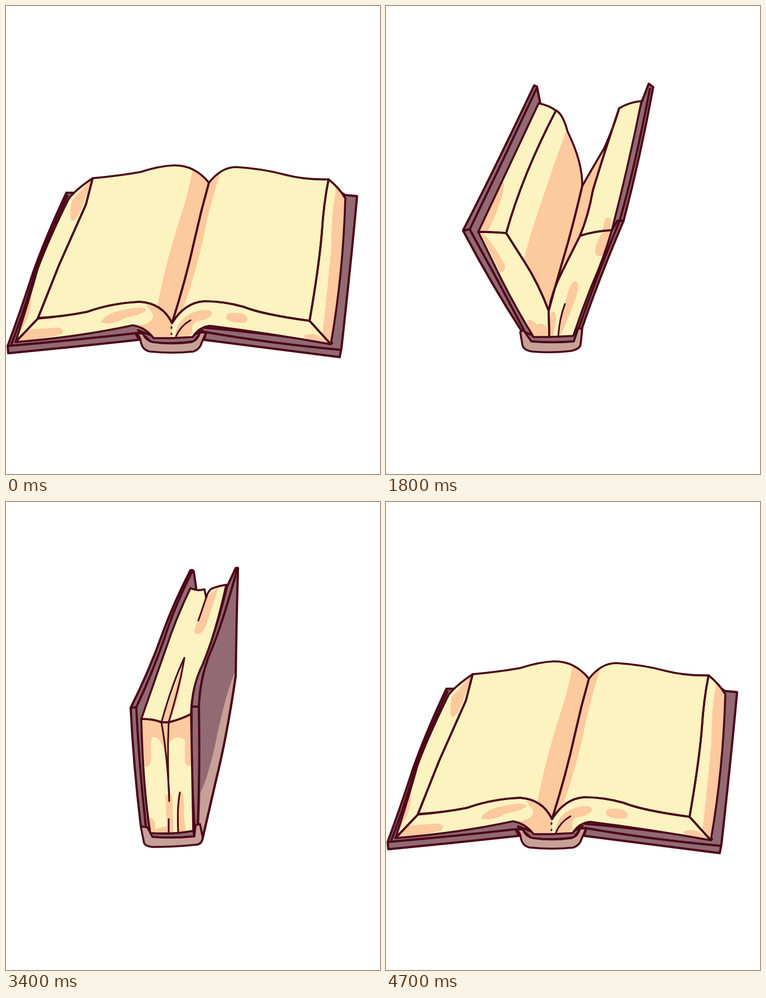
An HTML page with a canvas that plays this animation: 669x837 px, repeating every 5210 ms.

```html
<!DOCTYPE html>
<html lang="en">
<head>
<meta charset="utf-8">
<title>Book</title>
<style>
html, body { margin: 0; width: 100%; height: 100%; overflow: hidden; background: #fff; }
canvas { display: block; }
</style>
</head>
<body>
<canvas id="stage" width="669" height="837"></canvas>
<script>
const ctx = document.getElementById('stage').getContext('2d');
const INK = '#4b0718', COVER = '#926a74', SPINE = '#c7a198', PAGE = '#fcf3c1', TINT = '#fdc99f';

// Every path uses absolute "x y" pairs, so matching poses can be blended.
const open = {
  board: [
    'M108 334 L124 334 L150 320 L363 330 L580 320 L606 338 L628 340 Q617 460 600 612 L597 628 Q470 612 354 597 L358 584 L232 586 L238 597 Q120 610 4 621 L3 608 Q28 540 48 478 Q70 415 108 334 Z',
    'M236 580 L262 590 L333 590 L352 580 L336 600 Q297 606 260 601 Z'
  ],
  edge: [
    'M3 608 Q120 598 234 585',
    'M356 583 Q470 603 599 615',
    'M110 339 Q75 415 53 472 Q38 530 10 604',
    'M340 574 Q450 583 583 603'
  ],
  spine: ['M232 585 Q240 590 241 600 Q244 616 258 618 Q297 622 335 618 Q347 614 350 602 L358 584 L347 584 Q343 598 332 601 Q297 606 262 601 Q250 598 245 586 Z'],
  left: [
    'M155 308 Q200 304 240 297 Q274 286 300 285 Q337 284 363 316 Q349 365 338 415 Q322 488 297 567 Q280 532 240 529 Q190 531 145 547 Q105 555 57 558 L95 463 Q122 402 143 355 L155 308 Z',
    'M155 308 Q125 328 112 345 Q75 420 56 472 Q40 530 17 601 L57 559 L95 463 Q122 402 143 355 L155 308 Z',
    'M297 594 L264 594 Q250 575 227 571 Q130 592 17 601 L57 559 Q105 555 145 547 Q190 531 240 529 Q280 532 297 567'
  ],
  right: [
    'M363 316 Q385 288 412 288 Q460 291 500 302 Q535 311 577 310 Q568 355 565 405 Q560 465 543 563 Q460 552 425 538 Q390 528 355 528 Q320 530 297 567 Q322 488 338 415 Q349 365 363 316 Z',
    'M577 310 Q596 325 607 344 Q603 480 581 605 L543 563 Q560 465 565 405 Q568 355 577 310 Z',
    'M297 567 Q320 530 355 528 Q390 528 425 538 Q460 552 543 563 L581 605 Q470 585 365 572 Q345 574 334 592 L297 594'
  ],
  tintL: [
    'M334 290 Q355 300 363 316 Q349 365 338 415 Q322 488 297 567 Q290 545 270 540 Q283 470 308 390 Q328 330 334 290 Z',
    'M155 308 L118 348 Q112 380 118 384 Q128 385 140 348 Z',
    'M42 512 Q50 525 38 560 L16 602 Q80 593 100 587 Q107 577 92 575 L35 579 L22 592 Z',
    'M170 566 Q175 547 230 540 Q245 538 252 543 Q245 552 215 557 Q190 572 170 566 Z',
    'M250 534 Q285 540 297 567 L297 596 L262 594 Q250 576 235 572 Q266 567 263 551 Z'
  ],
  tintR: [
    'M363 316 Q372 302 383 299 Q362 365 351 425 Q335 490 318 538 L297 567 Q322 488 338 415 Q349 365 363 316 Z',
    'M588 318 L609 344 Q603 480 581 605 L566 588 Q576 500 582 430 Q582 370 590 330 Z',
    'M394 552 Q400 546 423 550 Q438 558 428 566 Q405 568 394 560 Z',
    'M532 590 Q545 583 560 590 L581 605 L540 598 Z',
    'M302 592 Q305 560 335 548 Q365 538 369 550 Q365 560 342 564 Q330 568 334 586 L320 592 Z'
  ],
  ink: ['M304 591 Q312 572 330 562', 'M296 574 L296 576', 'M296 586 L296 587']
};

const wide = {
  board: [
    'M150 249 L168 256 L225 400 L300 590 L250 592 L235 588 Q130 562 26 537 L28 523 Q75 390 150 249 Z',
    'M574 264 L597 258 L600 266 Q578 420 566 527 Q470 555 356 590 L345 590 L320 590 L480 400 Z',
    'M245 582 L262 592 L333 592 L348 582 L336 600 Q297 605 258 600 Z'
  ],
  edge: [
    'M29 522 Q130 551 240 582',
    'M158 258 Q85 390 36 519 L28 523',
    'M594 264 Q572 410 566 516 Q470 540 352 583',
    'M544 505 L550 516 L566 516'
  ],
  spine: ['M236 584 L248 610 Q252 617 262 618 Q297 622 325 618 Q343 615 350 600 L358 584 L350 580 L336 600 Q297 605 258 600 L242 580 Z'],
  left: [
    'M203 242 Q255 268 290 272 Q335 280 363 316 Q358 355 346 395 Q310 490 297 575 Q285 520 205 517 Q140 506 102 490 Q150 370 203 242 Z',
    'M203 242 Q185 245 160 261 Q100 385 54 517 Q70 498 102 490 Q150 370 203 242 Z',
    'M54 517 Q70 498 102 490 Q140 506 205 517 Q285 520 297 575 L297 594 L260 594 Q240 572 205 565 Q130 545 54 517 Z'
  ],
  right: [
    'M363 316 Q380 284 430 274 Q500 270 537 251 Q520 330 513 390 Q508 430 503 480 Q425 492 380 498 Q312 515 297 575 Q310 490 346 395 Q358 355 363 316 Z',
    'M537 251 Q555 252 575 263 Q562 390 544 505 Q525 490 503 480 Q508 430 513 390 Q520 330 537 251 Z',
    'M297 575 Q312 515 380 498 Q425 492 503 480 Q525 490 544 505 Q450 535 380 560 Q345 570 335 592 L297 594 Z'
  ],
  tintL: [
    'M330 285 Q355 298 363 316 Q358 355 346 395 Q310 490 297 575 Q290 540 260 525 Q275 450 297 375 Q318 320 330 285 Z',
    'M104 375 Q115 385 104 420 Q90 470 72 500 L52 517 Z',
    'M152 265 L174 258 Q168 288 150 312 L130 312 Z',
    'M62 512 Q100 508 102 520 Q103 530 90 530 L54 517 Z',
    'M164 534 Q180 528 235 538 Q280 545 295 594 L260 594 Q250 565 235 552 Q190 548 168 543 Z'
  ],
  tintR: [
    'M363 316 Q372 302 385 297 Q365 370 355 420 Q340 480 325 520 Q305 540 297 575 Q310 490 346 395 Q358 355 363 316 Z',
    'M363 536 Q365 524 385 523 Q402 524 395 535 Q375 545 363 536 Z',
    'M303 590 Q312 550 345 545 Q355 552 335 562 Q312 575 310 592 Z',
    'M490 520 Q492 508 525 500 L546 506 L515 520 Z',
    'M548 360 Q560 355 561 362 Q555 440 546 506 L536 498 Q545 420 548 360 Z'
  ],
  ink: ['M306 592 Q310 572 327 561']
};

const narrow = {
  board: [
    'M265 142 L270 144 L276 174 L290 400 L300 590 L262 597 L243 582 Q190 500 139 404 L138 401 Q190 300 265 142 Z',
    'M458 170 L470 139 L478 145 Q455 270 425 384 Q380 490 350 578 L338 595 L300 590 L400 350 Z',
    'M246 582 L264 590 L334 588 L344 576 L336 600 Q297 603 260 600 Z'
  ],
  edge: [
    'M150 400 Q200 490 248 582',
    'M269 148 Q210 275 150 399 L138 402',
    'M472 148 Q445 290 418 384 Q380 475 344 578',
    'M404 401 L414 384 L425 384'
  ],
  spine: ['M240 583 L244 606 Q246 616 262 618 Q297 621 330 617 Q346 614 348 606 L351 578 L344 576 L336 600 Q297 603 260 600 L246 580 Z'],
  left: [
    'M304 187 Q316 192 325 225 Q352 280 351 322 Q340 370 325 425 Q303 500 291 545 Q272 495 248 458 Q225 422 215 406 Q244 302 304 187 Z',
    'M304 187 Q292 178 273 174 Q218 290 165 404 Q190 404 215 406 Q244 302 304 187 Z',
    'M165 404 Q190 404 215 406 Q225 422 248 458 Q272 495 291 545 L292 592 L264 592 Q235 545 207 490 Q185 445 165 404 Z'
  ],
  right: [
    'M351 322 Q375 280 390 255 Q410 210 417 183 Q388 270 370 330 Q362 375 347 411 Q330 445 315 475 Q297 510 291 545 Q303 500 325 425 Q340 370 351 322 Z',
    'M417 183 Q435 172 457 170 Q434 285 404 401 Q375 402 347 411 Q362 375 370 330 Q388 270 417 183 Z',
    'M291 545 Q297 510 315 475 Q330 445 347 411 Q375 402 404 401 Q390 450 368 500 Q350 545 335 590 L292 592 Z'
  ],
  tintL: [
    'M322 225 Q352 280 351 322 Q340 370 325 425 Q303 500 291 545 Q270 490 247 452 Q260 400 285 330 Q305 270 322 225 Z',
    'M206 312 Q216 315 206 345 Q195 380 182 402 L166 403 Z',
    'M272 174 L272 174 Q272 174 272 174 L272 174 Z',
    'M174 407 Q192 425 212 462 Q215 475 205 477 L168 404 Z',
    'M252 564 Q258 556 270 570 Q288 560 292 594 L264 594 Q258 580 255 572 Q253 568 252 564 Z'
  ],
  tintR: [
    'M351 322 Q385 270 408 215 Q388 270 370 330 Q362 375 347 411 Q312 475 291 545 Q297 520 291 545 Q303 500 325 425 Q340 370 351 322 Z',
    'M310 590 Q324 486 341 493 Q348 503 333 540 Q318 580 310 590 Z',
    'M292 592 Q290 550 299 545 Q306 552 304 565 Q300 580 300 592 Z',
    'M376 446 Q370 430 388 404 L404 402 L388 448 Z',
    'M392 380 Q400 376 403 382 Q402 392 400 400 L388 402 Q389 390 392 380 Z'
  ],
  ink: ['M308 592 Q310 560 320 533']
};

const shut = {
  board: [
    'M330 122 Q335 121 336 125 L340 153 L300 400 L300 590 L255 597 L241 578 Q228 470 223 368 Q255 305 280 235 Q300 180 330 122 Z',
    'M411 118 L415 118 Q412 220 411 310 Q395 420 375 500 L352 600 L337 582 Q331 480 332 367 Q335 320 352 288 Q375 235 395 152 Z',
    'M250 580 L258 588 L335 586 L337 598 Q300 602 260 599 Z'
  ],
  rim: ['M411 300 Q397 415 375 498 L353 598 L346 576 L348 520 Q362 490 375 430 Q392 345 411 300 Z'],
  edge: [
    'M332 126 Q300 190 283 245 Q260 310 233 367 L223 368',
    'M233 367 Q238 470 250 580',
    'M413 122 Q385 225 365 270 Q347 315 345 366 L333 366',
    'M345 366 Q347 480 343 578',
    'M411 300 L411 310 Q395 420 375 500 L352 600'
  ],
  spine: ['M241 580 L247 610 Q250 616 262 617 Q300 617 340 613 Q351 612 352 600 L347 576 L339 578 L337 598 Q300 602 262 599 L253 582 Z'],
  left: ['M330 154 Q342 160 355 156 L358 171 Q362 158 368 155 Q380 150 394 148 Q375 235 352 290 Q332 330 331 379 Q315 388 291 394 L278 394 Q265 388 242 388 Q262 330 285 265 Q305 205 330 154 Z'],
  right: ['M242 388 Q265 388 278 394 L291 394 Q315 388 331 379 Q333 480 335 588 Q300 595 258 592 Q245 510 242 388 Z'],
  tintL: [
    'M242 388 L278 394 L285 460 Q280 420 264 420 Q257 420 260 455 Q258 480 248 472 Z',
    'M319 279 Q303 330 278 394 L284 440 L290 440 L292 394 Q315 340 319 279 Z',
    'M358 171 L380 152 Q375 170 358 220 Q350 240 338 235 Q335 225 344 212 Z',
    'M255 565 Q270 565 266 585 L288 580 L285 525 Q290 520 297 525 L300 592 L256 594 Z'
  ],
  tintR: [
    'M291 394 L331 380 L335 470 Q322 475 320 465 L320 425 Q305 415 292 430 Z',
    'M306 592 Q303 520 312 516 Q320 520 318 560 L322 592 Z'
  ],
  ink: [
    'M319 279 Q299 320 278 394 Q288 450 292 525',
    'M319 279 Q313 320 291 394 Q288 460 292 535',
    'M291 567 L291 592',
    'M308 590 Q306 545 311 520',
    'M358 171 Q350 195 344 212'
  ]
};

// Halfway pose: average the points, then push them out so the boards swing on an arc.
function blend(a, b) {
  const pairs = s => [...s.matchAll(/(\d+) (\d+)/g)].map(m => [+m[1], +m[2]]);
  const mix = (p, q) => {
    const ends = pairs(q);
    let i = 0;
    return p.replace(/(\d+) (\d+)/g, (_, px, py) => {
      const [qx, qy] = ends[i++];
      const x = (+px + qx) / 2, y = (+py + qy) / 2;
      const dx = (x - 297 - (590 - y) * 0.24) * Math.min(1, Math.max(0, (600 - y) / 80));
      return `${x + 0.08 * dx} ${y - 0.06 * Math.abs(dx)}`;
    });
  };
  const out = {};
  for (const k in a) out[k] = a[k].map((p, i) => mix(p, b[k][i]));
  return out;
}

function compile(pose) {
  const get = k => (pose[k] || []).map(d => new Path2D(d));
  const pages = [...get('left'), ...get('right')];
  const mask = new Path2D();
  pages.forEach(p => mask.addPath(p));
  return {
    board: get('board'), rim: get('rim'), edge: get('edge'), spine: get('spine'),
    pages, mask, tint: [...get('tintL'), ...get('tintR')], ink: get('ink')
  };
}

const poses = [open, wide, blend(wide, narrow), narrow, shut].map(compile);

function paint(paths, fill, line) {
  ctx.lineWidth = line;
  for (const p of paths) {
    if (fill) { ctx.fillStyle = fill; ctx.fill(p); }
    if (line) ctx.stroke(p);
  }
}

function draw(b) {
  ctx.fillStyle = '#fff';
  ctx.fillRect(0, 0, 669, 837);
  ctx.strokeStyle = INK;
  ctx.lineCap = ctx.lineJoin = 'round';
  paint(b.board, COVER, 4);
  paint(b.rim, SPINE, 0);
  paint(b.edge, null, 4);
  paint(b.spine, SPINE, 3.6);
  paint(b.pages, PAGE, 0);
  ctx.save();
  ctx.clip(b.mask);
  paint(b.tint, TINT, 0);
  ctx.restore();
  paint(b.pages, null, 3.6);
  paint(b.ink, null, 3);
}

const LOOP = 5210, SWING = 2600, STEP = 100;

function poseAt(t) {
  const u = t % SWING;
  if (u < 500 || u >= 2100) return 0;
  if (u < 800) return 1 + Math.floor((u - 500) / STEP);
  if (u < 1800) return 4;
  return 3 - Math.floor((u - 1800) / STEP);
}

const start = performance.now();
function tick() {
  draw(poses[poseAt((performance.now() - start) % LOOP)]);
  requestAnimationFrame(tick);
}
tick();
</script>
</body>
</html>
```
